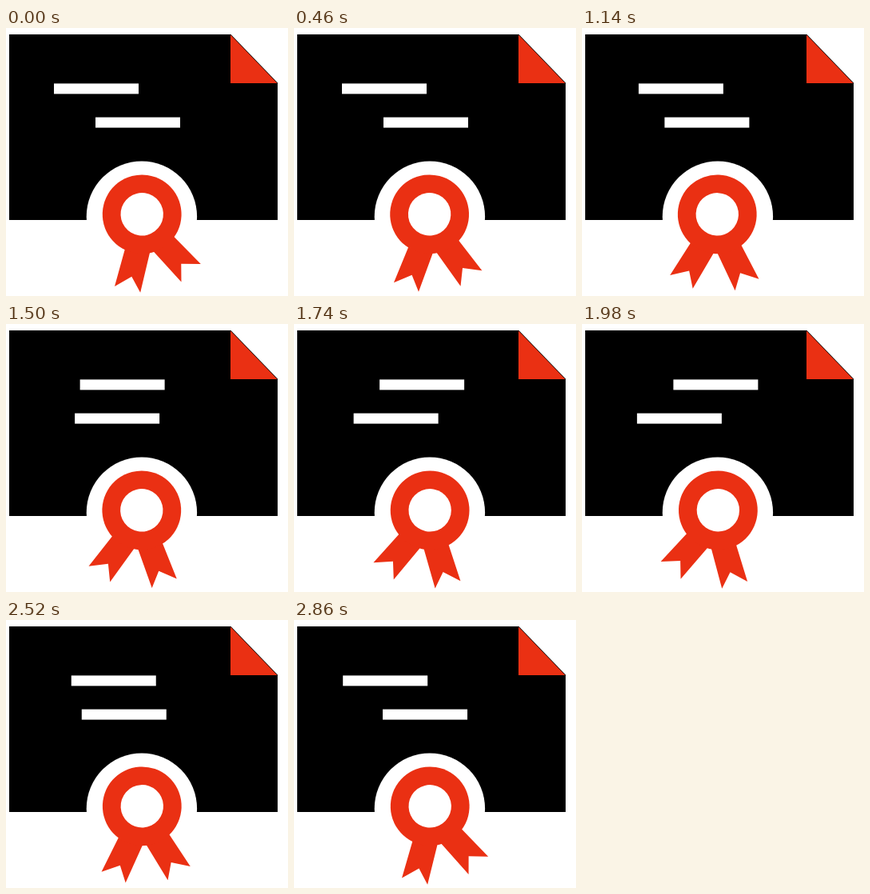
Animation of 353x335 px, one loop 2.88 s. Source, as an HTML page with a canvas:

```html
<!DOCTYPE html>
<html lang="en">
<head>
<meta charset="utf-8">
<title>Certificate</title>
<style>
html, body { margin: 0; width: 100%; height: 100%; overflow: hidden; background: #fff; }
canvas { display: block; }
</style>
</head>
<body>
<canvas id="stage" width="353" height="335"></canvas>
<script>
const ctx = document.getElementById('stage').getContext('2d');
const LOOP = 2880, STEP = 20, RED = '#ea3013', WHITE = '#fff';
const RAD = Math.PI / 180;

// Linear keyframes, evenly spread over the loop
function track(keys, p) {
  const pos = p * (keys.length - 1);
  const i = Math.min(Math.floor(pos), keys.length - 2);
  return keys[i] + (keys[i + 1] - keys[i]) * (pos - i);
}

function poly(color, points) {
  ctx.fillStyle = color;
  ctx.beginPath();
  for (const [x, y] of points) ctx.lineTo(x, y);
  ctx.closePath();
  ctx.fill();
}

function disc(color, x, y, r) {
  ctx.fillStyle = color;
  ctx.beginPath();
  ctx.arc(x, y, r, 0, Math.PI * 2);
  ctx.fill();
}

function bar(x, y) {
  ctx.fillStyle = WHITE;
  ctx.fillRect(x, y, 106, 13);
}

function rosette(x, y, angle) {
  ctx.save();
  ctx.translate(x, y);
  ctx.rotate(angle * RAD);
  for (const side of [-1, 1]) {
    const tail = [[1.5, 47], [26.5, 94.3], [32, 72.2], [55.7, 78.7], [29.7, 33.7]];
    poly(RED, tail.map(([px, py]) => [px * side, py]));
  }
  disc(RED, 0, 0, 49.4);
  disc(WHITE, 0, 0, 26.7);
  ctx.restore();
}

function draw(ms) {
  const p = (Math.floor(ms / STEP) * STEP % LOOP) / LOOP;
  ctx.fillStyle = WHITE;
  ctx.fillRect(0, 0, 353, 335);

  poly('#000', [[4, 8], [281.5, 8], [340, 68.5], [340, 240], [4, 240]]);
  poly(RED, [[281, 8.5], [339.5, 69], [281, 69]]);

  const shift = track([0, 0, 1, 0], p);
  bar(60 + 58 * shift, 69.4);
  bar(112 - 46 * shift, 111.6);

  disc(WHITE, 169.9, 235.7, 69.2);
  rosette(track([170.2, 169, 170.4, 170.2], p), 232.8, track([-14.5, -0.3, 14.7, -14.5], p));
}

let start;
function tick(now) {
  if (start === undefined) start = now;
  draw(now - start);
  requestAnimationFrame(tick);
}
draw(0);
requestAnimationFrame(tick);
</script>
</body>
</html>
```
